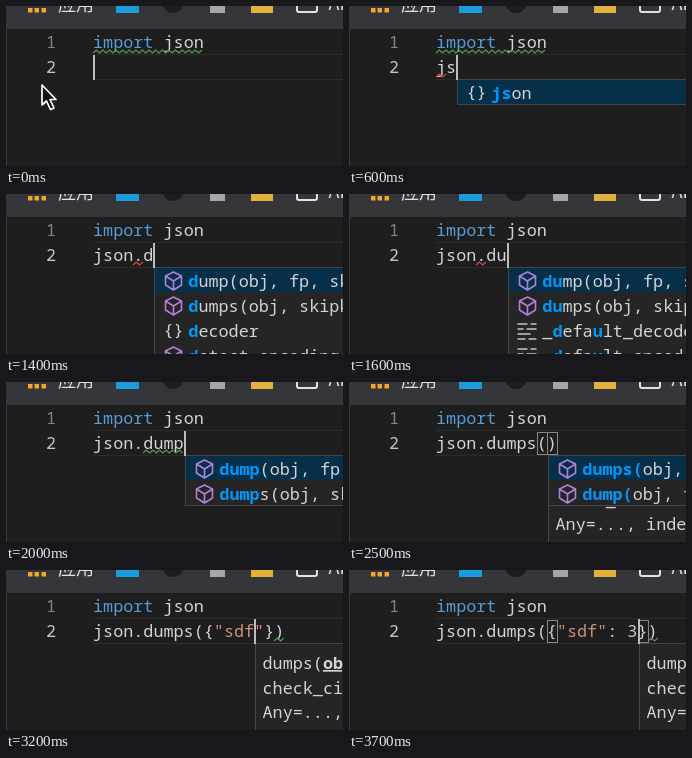
These frames come from a looping animation (337 by 160 pixels, 3.8 s). An HTML page:

```html
<!DOCTYPE html>
<html lang="en">
<head>
<meta charset="utf-8">
<title>Typing with completion</title>
<style>
  html, body { margin: 0; width: 100%; height: 100%; overflow: hidden; background: #1e1e1e; }
  svg { display: block; width: 337px; height: 160px; }
  text { white-space: pre; font: 16.8px "Noto Sans Mono", "DejaVu Sans Mono", monospace; fill: #d4d4d4; }
  .bar text { font: 18px "Noto Sans CJK SC", "Noto Sans CJK", sans-serif; fill: #dfe1e5; }
  .num { fill: #858585; }
  .on { fill: #c6c6c6; }
  .key { fill: #569cd6; }
  .str { fill: #ce9178; }
  .int { fill: #c5cdbf; }
  .hit { fill: #0097fb; font-weight: bold; }
  .arg { font-weight: bold; text-decoration: underline; }
  .wave { fill: none; stroke-width: 1.2; }
  .box { fill: none; stroke: #888; }
  .panel { fill: #252526; stroke: #454545; }
  .cube { fill: none; stroke: #b180d7; stroke-width: 1.6; stroke-linejoin: round; }
  .list { fill: none; stroke: #c5c5c5; stroke-width: 1.6; }
  #mouse { fill: #111; stroke: #fff; stroke-width: 1.7; stroke-linejoin: round; }
</style>
</head>
<body>
<svg viewBox="0 0 337 160">
  <rect width="337" height="160" fill="#1e1e1e"/>
  <rect y="23" width="1" height="137" fill="#38393b"/>
  <g class="bar">
    <rect width="337" height="23" fill="#35363a"/>
    <path d="M22 2h4.500v4.500h-4.500zM28.500 2h4.500v4.500h-4.500zM35.500 2h4.500v4.500h-4.500z" fill="#f0a830"/>
    <text x="52" y="5">应用</text>
    <rect x="110" y="-16" width="23" height="23" fill="#1a9bdc"/>
    <circle cx="167" cy="-4" r="11" fill="#1b1d20"/>
    <rect x="204" y="-8" width="15" height="15" fill="#a5a5a5"/>
    <rect x="245" y="-15" width="22" height="22" fill="#e0b23c"/>
    <rect x="291" y="-12" width="20" height="18" rx="2" fill="none" stroke="#dfe1e5" stroke-width="2"/>
    <text x="322.500" y="4">AI</text>
  </g>
  <path d="M87 48.500H337M87 73.500H337" stroke="#2c2c2c"/>
  <text class="num" x="40" y="42">1</text>
  <text class="on" x="40" y="67">2</text>
  <text x="87" y="42"><tspan class="key">import</tspan> json</text>
  <g id="live"></g>
  <path id="mouse" d="M36 79V99L40.500 95L44.500 103.500L48 102L44 93.500H50Z"/>
</svg>
<script>
const LOOP = 3800, LEFT = 87, CW = 10.08, ROW = 25, TOP = 74;
const live = document.getElementById('live');
const mouse = document.getElementById('mouse');
const col = n => Math.round(LEFT + n * CW);

const DUMP = 'dump(obj, fp, skipkeys=...', DUMPS = 'dumps(obj, skipkeys=...';
const DEC = '_default_decoder', ENC = '_default_encoder';
const JSON_ITEM = ['{json'];   // first character selects the icon
const RED = '#d8483f', GREEN = '#4f9f4f', FADED = '#777';

// Each step: time, code, caret column, extras
const steps = [
  [0, '', 0, { unused: 1 }],
  [100, 'j', 1, { unused: 1 }],
  [500, 'js', 2, { unused: 1, items: JSON_ITEM, hit: 'js', wave: [0, 1, RED] }],
  [800, 'jso', 3, { unused: 1, items: JSON_ITEM, hit: 'jso', wave: [0, 1, RED] }],
  [1000, 'json', 4, { unused: 1, items: JSON_ITEM, hit: 'json', wave: [0, 1, RED] }],
  [1200, 'json.', 5, { unused: 1, items: ['{codecs', '{decoder', 'o' + DUMP, 'o' + DUMPS], hit: '' }],
  [1400, 'json.d', 6, { items: ['o' + DUMP, 'o' + DUMPS, '{decoder', 'odetect_encoding(b)'], hit: 'd', wave: [4, 5, RED] }],
  [1600, 'json.du', 7, { items: ['o' + DUMP, 'o' + DUMPS, '=' + DEC, '=' + ENC], hit: 'du', wave: [4, 5, RED] }],
  [1800, 'json.dum', 8, { items: ['o' + DUMP, 'o' + DUMPS], hit: 'dum', wave: [4, 5, RED] }],
  [1900, 'json.dump', 9, { items: ['o' + DUMP, 'o' + DUMPS], hit: 'dump', wave: [5, 9, GREEN] }],
  [2100, 'json.dumps', 10, { items: ['o' + DUMPS], hit: 'dumps', wave: [5, 9, GREEN] }],
  [2300, 'json.dumps()', 11, { items: ['o' + DUMPS, 'o' + DUMP], hit: 'dumps(', box: [10, 11] }],
  [2400, 'json.dumps()', 11, { items: ['o' + DUMPS, 'o' + DUMP], hit: 'dumps(', box: [10, 11], hint: 1 }],
  [2500, 'json.dumps()', 11, { items: ['o' + DUMPS, 'o' + DUMP], hit: 'dumps(', box: [10, 11], hint: 1, blink: 1 }],
  [2700, 'json.dumps({})', 12, { box: [11, 12], hint: 1 }],
  [2900, 'json.dumps({""})', 13, { hint: 1 }],
  [3000, 'json.dumps({"s"})', 14, { hint: 1 }],
  [3100, 'json.dumps({"sd"})', 15, { hint: 1 }],
  [3200, 'json.dumps({"sdf"})', 16, { hint: 1, wave: [18, 19, GREEN] }],
  [3300, 'json.dumps({"sdf"})', 17, { hint: 1, wave: [18, 19, GREEN] }],
  [3400, 'json.dumps({"sdf":})', 18, { hint: 1, wave: [19, 20, GREEN] }],
  [3600, 'json.dumps({"sdf": })', 19, { hint: 1, box: [11, 19], wave: [20, 21, FADED] }],
  [3700, 'json.dumps({"sdf": 3})', 20, { hint: 1, box: [11, 20], wave: [21, 22, FADED] }]
];

const span = (cls, s) => `<tspan class="${cls}">${s}</tspan>`;
const text = (x, y, s) => `<text x="${x}" y="${y}">${s}</text>`;

function wave(from, to, y, color) {
  let d = `M${from} ${y + 2}`;
  for (let x = from, up = true; x + 3.3 <= to + 1; x += 3.3, up = !up) d += `l3.300 ${up ? -3 : 3}`;
  return `<path class="wave" stroke="${color}" d="${d}"/>`;
}

const paint = code => code.replace(/"\w*"|\d/g, m => span(m[0] === '"' ? 'str' : 'int', m));

// Marks the typed letters: a prefix, or else scattered matches
function mark(label, hit) {
  let i = 0;
  return [...label].map(c => c === hit[i] || (c === '(' && hit.endsWith('('))
    ? (i++, span('hit', c)) : c).join('');
}

function icon(kind, x, y) {
  if (kind === '{') return text(x - 1, y + 18, '{}');
  const d = kind === 'o'
    ? 'M9 0L17 4V13L9 18L1 13V4ZM1 4L9 9L17 4M9 9V18'
    : 'M-1 2H9M12 2H18M-1 7H5M8 7H18M-1 12H12M-1 17H7M10 17H18';
  return `<path class="${kind === 'o' ? 'cube' : 'list'}" transform="translate(${x} ${y + 4})" d="${d}"/>`;
}

function popup(x, items, hit) {
  const h = items.length * ROW;
  return `<rect class="panel" x="${x + .5}" y="${TOP - .5}" width="400" height="${h}"/>` +
    `<rect x="${x + 1}" y="${TOP}" width="400" height="${ROW - 1}" fill="#062f4a"/>` +
    items.map((it, i) => {
      const y = TOP + i * ROW;
      return icon(it[0], x + 10.5, y) + text(x + 34.3, y + 19, mark(it.slice(1), hit));
    }).join('');
}

function hint(x) {
  const lines = ['dumps(' + span('arg', 'obj') + ': Any, *,', 'check_circular: bool=...', 'Any=..., indent: Any=...'];
  return `<rect class="panel" x="${x + .5}" y="${TOP - .5}" width="400" height="120"/>` +
    lines.map((s, i) => text(x + 7.5, TOP + 25 + i * 24.5, s)).join('');
}

function view([, code, caret, o]) {
  const x = col(caret);
  let s = o.unused ? wave(LEFT, col(11), 45, GREEN) : '';
  for (const c of o.box || []) s += `<rect class="box" x="${col(c) + .5}" y="50.500" width="10" height="22"/>`;
  s += text(LEFT, 67, paint(code));
  if (o.wave) s += wave(col(o.wave[0]), col(o.wave[1]), 69, o.wave[2]);
  if (o.hint) s += hint(x + 1);
  if (o.items) s += popup(x + 1, o.items, o.hit);
  if (!o.blink) s += `<rect x="${x}" y="49" width="2" height="25" fill="#bcbcba"/>`;
  return s;
}

let shown = -1;
function draw(now) {
  const t = now % LOOP;
  let i = steps.length - 1;
  while (steps[i][0] > t) i--;
  if (i !== shown) {
    shown = i;
    live.innerHTML = view(steps[i]);
    mouse.style.display = i ? 'none' : '';
  }
  requestAnimationFrame(draw);
}
draw(0);
</script>
</body>
</html>
```
